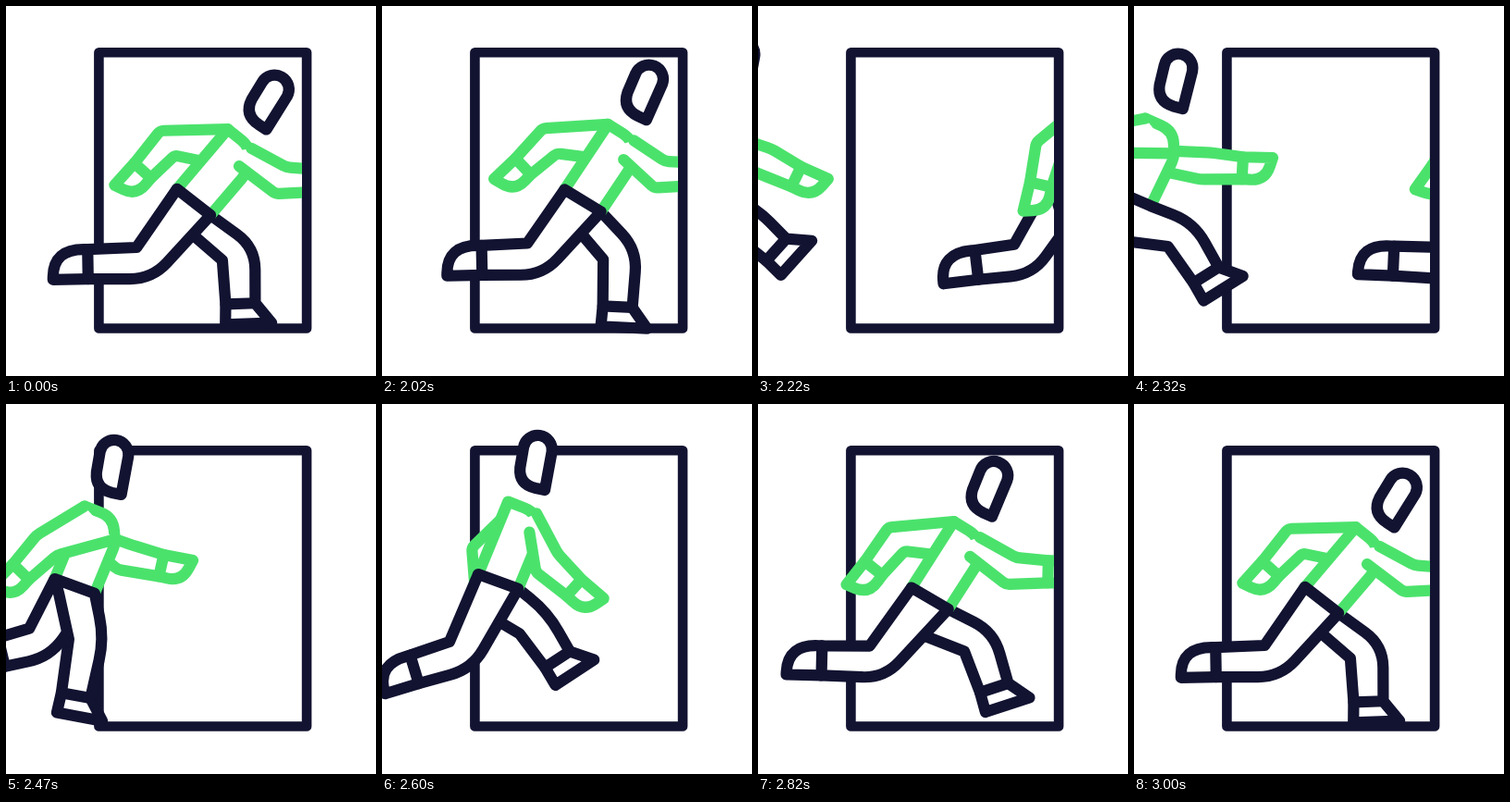
An HTML page with a canvas that plays this animation: 400 by 400 pixels, repeating every 3020 ms.

```html
<!DOCTYPE html>
<html lang="en">
<head>
<meta charset="utf-8">
<title>Runner through a doorway</title>
<style>
html, body { margin: 0; width: 100%; height: 100%; overflow: hidden; background: #fff; }
canvas { display: block; width: 400px; height: 400px; }
</style>
</head>
<body>
<canvas id="stage"></canvas>
<script>
const INK = '#121331', GREEN = '#4be26c';
const DOOR_LINE = 10.6, BODY_LINE = 12.2;
const LOOP = 3020, HOLD = 2020, SPAN = 400, STEPS = 40;

// Six stages of a stride: reach, strike, stance, push, trail, swing.
// Angles in degrees from straight down, forward positive.
const LEG = {
  thigh: [53, 41, 10, -34, -39, -29],
  thighLength: [58, 74, 59, 95, 85, 71],
  shin: [50, 2, -13, -85, -89, -72],
  shinLength: [49, 54, 62, 51, 61, 42]
};
const ARM = {
  upper: [-39, -77, -40, 46, 46, 36],
  upperLength: [57, 67, 59, 82, 80, 70],
  fore: [-16, -42, -41, 67, 90, 74]
};

const canvas = document.getElementById('stage');
const ctx = canvas.getContext('2d');
const dpr = window.devicePixelRatio || 1;
canvas.width = canvas.height = 400 * dpr;

const clamp = x => Math.max(0, Math.min(1, x));
const mix = (a, b, t) => a + (b - a) * t;
const rad = deg => deg * Math.PI / 180;

// Steps from p along a bone at the given angle, then sideways to its front.
function at(p, deg, along, side = 0, round = 0) {
  const s = Math.sin(rad(deg)), c = Math.cos(rad(deg));
  return [p[0] + along * s + side * c, p[1] + along * c - side * s, round];
}

// Smooth cyclic curve through evenly spaced values.
function cycle(vals, x) {
  const k = Math.floor(x), t = x - k;
  const [a, b, c, d] = [-1, 0, 1, 2].map(j => vals[(k + j + vals.length) % vals.length]);
  return b + t / 2 * (c - a + t * (2 * a - 5 * b + 4 * c - d + t * (3 * (b - c) + d - a)));
}

function poseOf(limb, stage) {
  return Object.fromEntries(Object.entries(limb).map(([name, vals]) => [name, cycle(vals, stage)]));
}

function toward(p, q, d) {
  const len = Math.hypot(q[0] - p[0], q[1] - p[1]) || 1;
  const f = Math.min(d / len, 0.9);
  return [mix(p[0], q[0], f), mix(p[1], q[1], f)];
}

// Polyline with rounded corners; `inner` extends only the fill.
function trace(pts, color, inner) {
  const path = new Path2D();
  pts.forEach((p, i) => {
    if (i && i < pts.length - 1 && p[2] > 0.5) {
      path.lineTo(...toward(p, pts[i - 1], p[2]));
      path.quadraticCurveTo(p[0], p[1], ...toward(p, pts[i + 1], p[2]));
    } else {
      path.lineTo(p[0], p[1]);
    }
  });
  const area = new Path2D(path);
  if (inner) area.lineTo(inner[0], inner[1]);
  ctx.fill(area);
  ctx.strokeStyle = color;
  ctx.stroke(path);
}

function leg(stage, body) {
  const { thigh, thighLength, shin, shinLength } = poseOf(LEG, stage);
  const knee = at(body.hips, thigh, thighLength);
  const ankle = at(knee, shin, shinLength);
  const bend = (thigh + shin) / 2;
  const point = clamp((-shin - 20) / 50);
  const seat = Math.max(0, Math.sin(rad(thigh)));
  const back = at(ankle, shin, 0, -16), front = at(ankle, shin, 0, 16);
  trace([
    body.front, body.back,
    [body.back[0] + 20 * seat, body.back[1] + 70 * seat],
    at(knee, bend, 0, -19),
    back,
    at(ankle, shin, 22 + 15 * point, -17, 34 * point),
    at(ankle, shin, 22 + 16 * point, 33 - 17 * point),
    front,
    at(knee, bend, 0, 19, 24),
    body.front
  ], INK);
  trace([back, front], INK);
}

function arm(stage, body, drop) {
  const { upper, upperLength, fore } = poseOf(ARM, stage);
  const { shoulder, lean } = body;
  const elbow = at(shoulder, upper, upperLength);
  const wrist = at(elbow, fore, 40);
  const bend = (upper + fore) / 2;
  const ahead = clamp(0.5 + upper / 70);
  const back = at(wrist, fore, 0, -12), front = at(wrist, fore, 0, 12);
  trace([
    at(shoulder, -lean, ahead * (31 + drop), ahead * 28),
    at(elbow, bend, 0, -15.5, 4),
    back,
    at(wrist, fore, mix(32, 25, ahead), -12, 16 * ahead),
    at(wrist, fore, mix(25, 32, ahead), 13, 16 * (1 - ahead)),
    front,
    at(elbow, bend, 0, 15.5, 4),
    at(shoulder, -lean, mix(32, 8 + drop, ahead), mix(36, 32, ahead))
  ], GREEN, at(shoulder, -lean, 17, 19));
  trace([back, front], GREEN);
}

function torso({ back, shoulder, front, lean }) {
  ctx.lineCap = 'butt';
  trace([back, shoulder, at(shoulder, -lean, 8, 32, 14), at(shoulder, -lean, 36, 38, 6), front], GREEN);
  ctx.lineCap = 'round';
}

function head(chin, tilt) {
  ctx.save();
  ctx.translate(chin[0], chin[1]);
  ctx.rotate(rad(tilt));
  ctx.beginPath();
  ctx.moveTo(0, 0);
  ctx.lineTo(1.5, -42);
  ctx.arc(-14, -42, 15.5, 0, Math.PI, true);
  ctx.lineTo(-30, -20);
  ctx.quadraticCurveTo(-29, -2, -10, -0.5);
  ctx.closePath();
  ctx.fill();
  ctx.strokeStyle = INK;
  ctx.stroke();
  ctx.restore();
}

// Everything follows from the share of the way covered.
function runner(way, x, top) {
  const stage = 4 + 6 * way - 0.45 * Math.sin(Math.PI * way) ** 8;
  const beat = Math.cos(2 * Math.PI * (stage - 1) / 3);
  const lean = 7 + 18 * Math.max(0, beat) ** 3;
  const sway = -130 * way * (1 - way) * (0.65 - way);
  const hips = [203 + x + sway, 201 + 11 * beat];
  const body = {
    hips, lean,
    back: at(hips, -lean - 13, 0, -23),
    front: at(hips, -lean - 13, 0, 23),
    shoulder: at(hips, -lean, -87)
  };

  ctx.save();
  ctx.beginPath();
  ctx.rect(0, top, 320, 400 - top);
  ctx.clip();
  ctx.lineWidth = BODY_LINE;
  arm(stage + 3, body, 22);
  leg(stage + 3, body);
  torso(body);
  leg(stage, body);
  arm(stage, body, 0);
  head(at(hips, -lean - 20, -111), 1.2 * lean);
  ctx.restore();
}

// The run advances in even steps, shown 30 and 20 ms in turn.
function progress(t) {
  const d = t - HOLD;
  if (d < 0) return 0;
  const step = 2 * Math.floor(d / 50) + (d % 50 >= 30 ? 1 : 0);
  return Math.min(1, (step + 1) / STEPS);
}

function draw() {
  const u = progress(performance.now() % LOOP);
  const way = 1 - (1 - u) ** 1.75;

  ctx.setTransform(dpr, 0, 0, dpr, 0, 0);
  ctx.fillStyle = '#fff';
  ctx.fillRect(0, 0, 400, 400);
  ctx.lineCap = ctx.lineJoin = 'round';
  ctx.lineWidth = DOOR_LINE;
  ctx.strokeStyle = INK;
  ctx.strokeRect(100.4, 50.2, 224.7, 298.3);

  // One runner leaves through the right side as the next comes in from the left.
  if (u < 1) runner(way, SPAN * way, u ? 50 : 0);
  if (u > 0) runner(way, SPAN * (way - 1), 0);
  requestAnimationFrame(draw);
}
draw();
</script>
</body>
</html>
```
